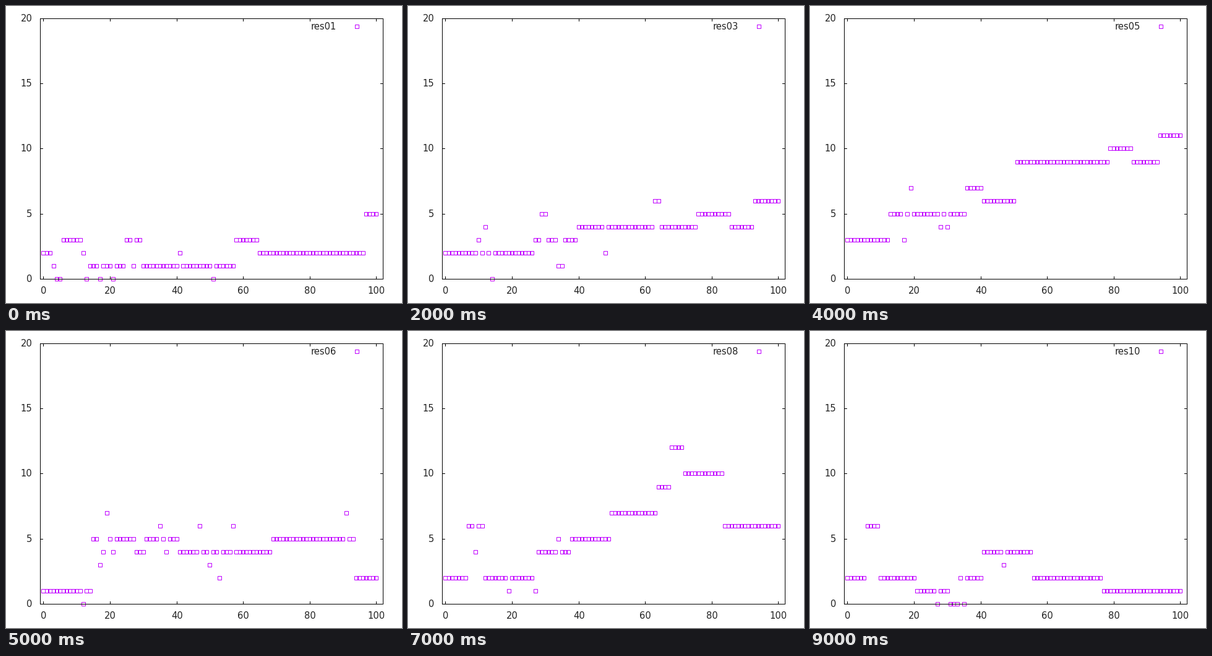
A matplotlib script that plays this animation: 640x480 px, repeating every 10000 ms.

```python
import math
import random

import matplotlib.pyplot as plt
from matplotlib.animation import FuncAnimation
from matplotlib.collections import LineCollection, PolyCollection

W, H, DPI = 640, 480, 80
PX = 72 / DPI                      # one pixel in points
LEFT, RIGHT, TOP, BOTTOM = 55, 609, 20, 441
PURPLE = "#c000ff"
FONT = dict(family="DejaVu Sans", size=14.7 * PX, color="#222222")
COUNT = 101


def px(x):
    return math.floor(LEFT + (x + 1) * (RIGHT - LEFT) / 103 + 0.5)


def py(y):
    return BOTTOM - math.floor(y * (BOTTOM - TOP) / 20 + 0.5)


def trace(restless, *plateaus):
    """Hold each (start, level); stray from it ever less often along x."""
    rng = random.Random(plateaus[-1][0])
    starts = dict(plateaus)
    ys, level = [], 0
    for x in range(COUNT):
        level = starts.get(x, level)
        stray = rng.random() < restless * (1 - x / COUNT)
        ys.append(max(0, level + rng.choice((-2, -1, 1, 2)) * stray))
    return ys


runs = [
    trace(0.15, (0, 2), (3, 0), (6, 3), (13, 1), (24, 3), (30, 1), (58, 3), (65, 2), (97, 5)),
    trace(0.20, (0, 2), (10, 1), (30, 3), (60, 4), (90, 5)),
    trace(0.25, (0, 2), (27, 3), (40, 4), (76, 5), (86, 4), (93, 6)),
    trace(0.05, (0, 0), (4, 6), (7, 1), (18, 2), (29, 1), (37, 4), (43, 3)),
    trace(0.15, (0, 3), (13, 5), (36, 7), (41, 6), (51, 9), (79, 10), (86, 9), (94, 11)),
    trace(0.35, (0, 1), (15, 5), (41, 4), (69, 5), (94, 2)),
    trace(0.20, (0, 1), (12, 3), (40, 4), (70, 3)),
    trace(0.05, (0, 2), (7, 6), (12, 2), (28, 4), (38, 5), (50, 7), (64, 9), (68, 12), (72, 10), (84, 6)),
    trace(0.20, (0, 1), (20, 3), (50, 2), (88, 1)),
    trace(0.05, (0, 2), (6, 6), (10, 2), (21, 1), (31, 0), (36, 2), (41, 4), (55, 2), (77, 1)),
]


def box(x, y, r=3):
    x, y = x + 0.5, y + 0.5
    return [(x - r, y - r), (x + r, y - r), (x + r, y + r), (x - r, y + r)]


def boxes(ys):
    return [box(px(x), py(y)) for x, y in enumerate(ys)] + [box(567, 33)]


def segment(x0, y0, x1, y1):
    return [(x0 + 0.5, y0 + 0.5), (x1 + 0.5, y1 + 0.5)]


fig = plt.figure(figsize=(W / DPI, H / DPI), dpi=DPI, facecolor="white")
ax = fig.add_axes([0, 0, 1, 1])
ax.set_xlim(0, W)
ax.set_ylim(H, 0)
ax.axis("off")

# Coordinates already sit on pixel centres, so snapping stays off.
marks = PolyCollection([], facecolors="none", edgecolors=PURPLE, linewidths=PX,
                       joinstyle="miter", snap=False, zorder=2)
ax.add_collection(marks)

lines = [segment(LEFT, TOP, RIGHT, TOP), segment(LEFT, BOTTOM, RIGHT, BOTTOM),
         segment(LEFT, TOP, LEFT, BOTTOM), segment(RIGHT, TOP, RIGHT, BOTTOM)]
for v in range(0, 101, 20):
    x = px(v)
    lines += [segment(x, BOTTOM, x, BOTTOM - 4), segment(x, TOP, x, TOP + 4)]
    ax.text(x + 0.5, 465, str(v), ha="center", va="baseline", **FONT)
for v in range(0, 21, 5):
    y = py(v)
    lines += [segment(LEFT, y, LEFT + 4, y), segment(RIGHT, y, RIGHT - 4, y)]
    ax.text(42.5, y + 5, str(v), ha="right", va="baseline", **FONT)
ax.add_collection(LineCollection(lines, colors="black", linewidths=PX, snap=False,
                                 capstyle="projecting", zorder=3))
label = ax.text(533.5, 38, "", ha="right", va="baseline", **FONT)


def draw(i):
    marks.set_verts(boxes(runs[i]))
    label.set_text(f"res{i + 1:02d}")
    return marks, label


anim = FuncAnimation(fig, draw, frames=len(runs), interval=1000,
                     repeat=True, repeat_delay=0, blit=False)
plt.show()
```
